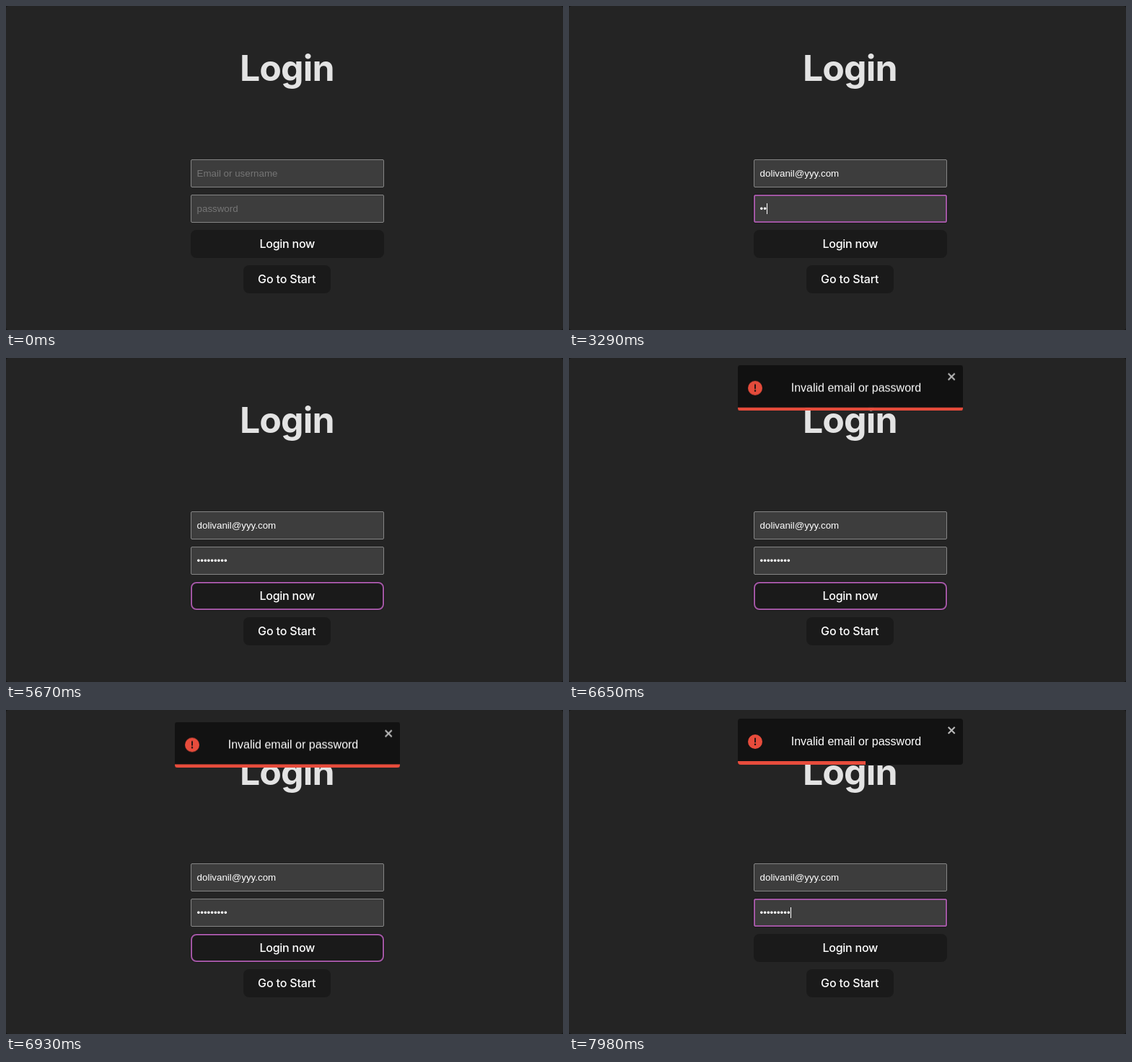
Write an HTML page that moves like this. It is 772x450 px and loops after 8 s.

```html
<!DOCTYPE html>
<html lang="en">
<head>
<meta charset="utf-8">
<title>Login</title>
<style>
  html, body { margin: 0; width: 100%; height: 100%; overflow: hidden; background: #161616; }
  #stage {
    position: relative; width: 772px; height: 450px; overflow: hidden;
    border-radius: 4px; background: #242424;
  }
  #stage div { position: absolute; box-sizing: border-box; white-space: pre; }

  #stage h1 {
    position: absolute; left: 189.3px; top: 58px; width: 400px; margin: 0;
    text-align: center; color: #e3e3e3; letter-spacing: -.9px;
    font: 700 50px/56px Inter, sans-serif;
  }

  .field, #submit { left: 256px; width: 268px; height: 39px; }
  .field { background: #3d3d3d; border: 1px solid #858585; border-radius: 2px; }
  .field .text {
    left: 7.6px; top: 11px; height: 15px; color: #fff;
    font: 13.333px/15px "Liberation Sans", Arial, sans-serif;
  }
  .field .text.hint { color: #757575; }
  .caret { top: 11px; width: 1px; height: 15px; background: #fff; }

  .button {
    height: 39px; border-radius: 8px; background: #1a1a1a; color: #fff;
    text-align: center; text-indent: -.5px; letter-spacing: -.25px;
    font: 500 16px/39px Inter, sans-serif;
  }
  .focus::after {
    content: ""; position: absolute; inset: 0; border-radius: 8px;
    border: 2px solid #a156a3; box-shadow: 0 0 0 1px #181818;
  }
  .field.focus::after { inset: -1px; border-radius: 3px; }

  #toast {
    left: 234px; top: 12px; width: 312px; height: 64px; overflow: hidden;
    border-radius: 4px; background: #121212;
  }
  #toast svg { position: absolute; left: 0; top: 0; }
  #message {
    left: 44px; top: 23px; width: 240px; color: #fff; text-align: center;
    font: 16px/18px "Liberation Sans", Arial, sans-serif;
  }
  #bar { left: 0; bottom: 0; width: 312px; height: 5px; background: #e74c3c; transform-origin: 0 0; }
</style>
</head>
<body>
<div id="stage">
  <h1>Login</h1>
  <div class="field" id="email" style="top:213px"><div class="text"></div><div class="caret"></div></div>
  <div class="field" id="password" style="top:262px"><div class="text"></div><div class="caret"></div></div>
  <div class="button" id="submit" style="top:311px">Login now</div>
  <div class="button" style="left:329px;top:360px;width:121px;letter-spacing:-.15px">Go to Start</div>
  <div id="toast">
    <svg width="312" height="64" fill="none" stroke-linecap="round">
      <circle cx="24" cy="32" r="10" fill="#e74c3c"/>
      <path d="M24 27.4v5" stroke="#121212" stroke-width="1.8"/>
      <circle cx="24" cy="35.8" r="1.25" fill="#121212"/>
      <path d="M291.7 11.7l9 9m0-9l-9 9" stroke="#b8b8b8" stroke-width="2.1" stroke-linecap="butt"/>
    </svg>
    <div id="message">Invalid email or password</div>
    <div id="bar"></div>
  </div>
</div>
<script>
  const LOOP = 8000, TICK = 70;
  const TEXT_X = 264.6, FIELD_X = 257;   // text start and inner edge of a field
  const ADDRESS = "dolivanil@yyy.com", ADDRESS_WIDTH = 110.6, DOT_WIDTH = 4.667;

  const $ = id => document.getElementById(id);
  const within = (t, spans) => spans.some(([from, to]) => t >= from && t < to);

  const PASTE_AT = 1750;
  const KEYS = [3010, 3290, 3360, 3500, 3570, 4340, 4480, 4690, 5040];
  const FOCUS = {
    email: [[700, 2100]],
    password: [[2100, 5250], [7490, LOOP]],
    submit: [[5250, 7490]]
  };
  const CARET = {
    email: [[700, 1400], [PASTE_AT, 2100]],
    password: [[2100, 2520], [3010, 4130], [4340, 5250], [7490, LOOP]]
  };

  const shift = (offset, y, opacity) => ({ offset, opacity, transform: `translateY(${y}px)` });
  const toastIn = [
    shift(0, -3000, 0), shift(.6, 25, 1), shift(.75, -10, 1), shift(.9, 5, 1), shift(1, 0, 1)
  ].map(step => ({ ...step, easing: "cubic-bezier(.215, .61, .355, 1)" }));

  const motions = [
    $("toast").animate(toastIn, { delay: 6297, duration: 700, fill: "both" }),
    $("bar").animate({ transform: ["scaleX(1)", "scaleX(0)"] }, { delay: 7115, duration: 2000, fill: "both" })
  ];
  motions.forEach(m => m.pause());

  function showField(id, value, hint, width, t) {
    const [text, caret] = $(id).children;
    const content = value || hint;
    if (text.textContent !== content) text.textContent = content;
    text.classList.toggle("hint", !value);
    caret.style.left = Math.round(TEXT_X + width) - FIELD_X + "px";
    caret.style.visibility = within(t, CARET[id]) ? "visible" : "hidden";
  }

  function render(t) {
    const pasted = t >= PASTE_AT;
    const dots = KEYS.filter(at => t >= at).length;
    showField("email", pasted ? ADDRESS : "", "Email or username", pasted ? ADDRESS_WIDTH : 0, t);
    showField("password", "•".repeat(dots), "password", dots * DOT_WIDTH, t);
    for (const id in FOCUS) $(id).classList.toggle("focus", within(t, FOCUS[id]));
    motions.forEach(m => { m.currentTime = t; });
  }

  const start = performance.now();
  function frame() {
    const t = (performance.now() - start) % LOOP;
    render(t - t % TICK);
    requestAnimationFrame(frame);
  }
  frame();
</script>
</body>
</html>
```
